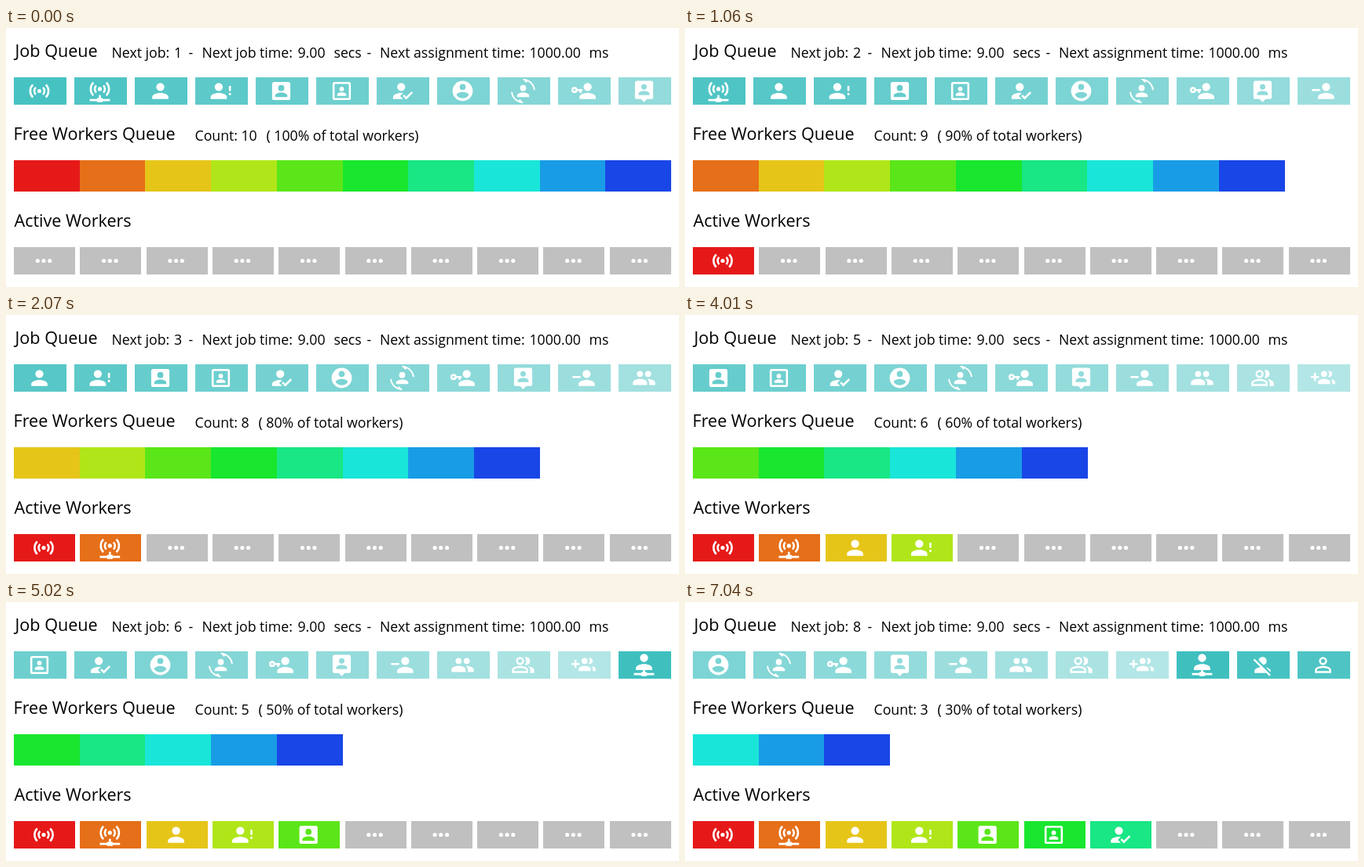
An HTML page for the animation above (8000 ms loop, 857x331 px).

```html
<!DOCTYPE html>
<html lang="en">
<head>
<meta charset="utf-8">
<title>Job queue</title>
<style>
  html, body { margin: 0; width: 100%; height: 100%; overflow: hidden; background: #fff; }
  svg { display: block; width: 857px; height: 331px; }
  text { font: 17.7px "Open Sans", "Noto Sans", sans-serif; white-space: pre; }
  text.title { font-size: 21.6px; }
  path { fill: #fff; fill-rule: evenodd; }
  rect { shape-rendering: crispEdges; }
</style>
</head>
<body>
<svg id="stage" viewBox="0 0 857 331"></svg>
<script>
const LOOP = 8000;
const ASSIGN_TIMES = [970, 2070, 3000, 4010, 5020, 6030, 7040];
const WORKERS = 10, VISIBLE_JOBS = 11, ICON_SCALE = 1.29;

// Icon parts, drawn on a 24-unit grid
const dot = (x, y, r) =>
  `M${x - r} ${y}a${r} ${r} 0 1 0 ${2 * r} 0a${r} ${r} 0 1 0 ${-2 * r} 0z`;

const shoulders = (x, y, w, h, foot) =>
  `M${x} ${y}c${w * .55} 0 ${w} ${h * .45} ${w} ${h}v${foot}h${-2 * w}v${-foot}` +
  `c0 ${-h * .55} ${w * .45} ${-h} ${w} ${-h}z`;

const person = (x = 12, y = 8, r = 4) =>
  dot(x, y, r) + shoulders(x, y + r * 1.5, r * 2, r, r / 2);

const outline = x =>
  dot(x, 8, 4) + dot(x, 8, 2.1) + shoulders(x, 13, 8, 4, 3) + shoulders(x, 14.9, 6.1, 2.1, 1.1);

const box = (x, y, size, r) => {
  const side = size - 2 * r, arc = (dx, dy) => `a${r} ${r} 0 0 1 ${dx} ${dy}`;
  return `M${x + r} ${y}h${side}${arc(r, r)}v${side}${arc(-r, r)}h${-side}${arc(-r, -r)}v${-side}${arc(r, -r)}z`;
};

const wave = (y, r, side) => {
  const outer = r * Math.SQRT1_2, inner = (r - 2) * Math.SQRT1_2, sweep = side > 0 ? 1 : 0;
  return `M${12 + side * outer} ${y - outer}A${r} ${r} 0 0 ${sweep} ${12 + side * outer} ${y + outer}` +
    `L${12 + side * inner} ${y + inner}A${r - 2} ${r - 2} 0 0 ${1 - sweep} ${12 + side * inner} ${y - inner}z`;
};

const antenna = y =>
  dot(12, y, 2) + wave(y, 6, -1) + wave(y, 6, 1) + wave(y, 10, -1) + wave(y, 10, 1);

const network = top =>
  `M11 ${top}h2V19h1a1 1 0 0 1 1 1h7v2h-7a1 1 0 0 1-1 1h-4a1 1 0 0 1-1-1H2v-2h7a1 1 0 0 1 1-1h1z`;

const IDLE = dot(6, 12, 2) + dot(12, 12, 2) + dot(18, 12, 2);

const JOB_ICONS = [
  antenna(12),
  antenna(10) + network(16),
  person(),
  person(10) + "M20 7h2v5h-2zM20 14h2v2h-2z",
  box(3, 3, 18, 2) + person(12, 9, 3),
  box(3, 3, 18, 2) + "M5 5h14v14H5z" + person(12, 10, 2.25),
  dot(11, 8, 4) + "M10 17l3 3H3v-2c0-2.2 3.6-4 8-4l1.9.1z" +
    "M21.1 12.5l1.4 1.4-6.5 6.6-3.5-3.5 1.4-1.4 2.1 2.1z",
  dot(12, 12, 10) + dot(12, 8, 3) +
    "M12 19.2c-2.5 0-4.7-1.3-6-3.2 0-2 4-3.1 6-3.1s6 1.1 6 3.1c-1.3 1.9-3.5 3.2-6 3.2z",
  person(12, 9, 3) +
    "M7.5 21.5l1.35-1.34 3.8 3.8L12 24C5.7 24 .56 19.2.05 13h1.5c.36 3.8 2.7 6.9 5.95 8.5z" +
    "M16.5 2.5l-1.35 1.34-3.8-3.8L12 0c6.3 0 11.4 4.8 11.95 11h-1.5c-.36-3.8-2.7-6.9-5.95-8.5z",
  person(16) + dot(3, 11, 3) + dot(3, 11, 1) + "M5.9 10H11v2h-1v2H8v-2H5.9z",
  "M5 2h14a2 2 0 0 1 2 2v14a2 2 0 0 1-2 2h-4l-3 3-3-3H5a2 2 0 0 1-2-2V4a2 2 0 0 1 2-2z" +
    person(12, 8, 2.7),
  person(15) + "M1 10h8v2H1z",
  dot(8, 8, 3) + dot(16, 8, 3) + shoulders(8, 13, 7, 3.5, 2.5) +
    "M16 13c2.3 0 7 1.2 7 3.5V19h-6v-2.5c0-1.5-.8-2.6-2-3.45z",
  outline(9) + "M13.7 4.2a4 4 0 1 1 0 7.6 6 6 0 0 0 0-7.6z" +
    "M16.5 13.2C18 14 19 15.3 19 17v3h4v-3c0-2.2-3.7-3.5-6.5-3.8z",
  dot(13, 8, 3) + shoulders(13, 13, 6, 3, 2) + "M0 10h3V7h2v3h3v2H5v3H3v-3H0z" +
    "M19.6 13.2c.9.7 1.4 1.6 1.4 2.8v2h3v-2c0-1.5-2.4-2.5-4.4-2.8z" +
    "M17.1 5.1a3 3 0 1 1 0 5.7 5 5 0 0 0 0-5.7z",
  person(12, 5) + network(17),
  "M12 4a4 4 0 0 1 .75 7.93L8.07 7.25A4 4 0 0 1 12 4z" +
    "M12.28 14L20 21.72 18.73 23l-3-3H4v-2c0-1.84 2.5-3.4 5.87-3.86L2.78 7.05l1.27-1.27z" +
    "M20 18v1.18l-4.86-4.86C18 14.93 20 16.35 20 18z",
  outline(12)
];

const jobColor = job => `hsl(180 50% ${50 + 2 * ((job + 1) % 16)}%)`;
const workerColor = worker => `hsl(${25.2 * worker} 80% 50%)`;

const rect = (x, y, w, h, fill) =>
  `<rect x="${x}" y="${y}" width="${w}" height="${h}" fill="${fill}"/>`;
const text = (x, y, content, style = "") =>
  `<text x="${x}" y="${y}" class="${style}">${content}</text>`;
const tile = (x, y, w, fill, icon) =>
  rect(x, y, w, 35, fill) +
  `<path transform="translate(${x + w / 2 - 1} ${y + 17.5}) scale(${ICON_SCALE}) translate(-12 -12)" d="${icon}"/>`;
const repeat = (count, draw) => Array.from({ length: count }, (_, i) => draw(i)).join("");

function scene(assigned) {
  const free = WORKERS - assigned;
  return text(11.5, 37, "Job Queue", "title") +
    text(134.5, 38, "Next job:") + text(214, 38, assigned + 1) + text(232.5, 38, "-") +
    text(249.5, 38, "Next job time:") + text(371.5, 38, "9.00") +
    text(417.5, 38, "secs") + text(459.5, 38, "-") +
    text(476, 38, "Next assignment time:") + text(666.5, 38, "1000.00") + text(742.5, 38, "ms") +
    repeat(VISIBLE_JOBS, i =>
      tile(10 + 77 * i, 63, 67, jobColor(assigned + i), JOB_ICONS[assigned + i])) +

    text(9.5, 143, "Free Workers Queue", "title") +
    text(240.5, 144, "Count:") + text(299.5, 144, free) +
    text(free > 9 ? 331.5 : 321.5, 144, `( ${free * 10}% of total workers)`) +
    repeat(free, i => rect(10 + 83.7 * i, 169, 84.05, 40, workerColor(assigned + i))) +

    text(10.5, 254, "Active Workers", "title") +
    repeat(WORKERS, i => i < assigned
      ? tile(10 + 84.3 * i, 280, 78, workerColor(i), JOB_ICONS[i])
      : tile(10 + 84.3 * i, 280, 78, "#c0c0c0", IDLE));
}

const stage = document.getElementById("stage");
const start = performance.now();
let shown = -1;

function tick() {
  const time = (performance.now() - start) % LOOP;
  const assigned = ASSIGN_TIMES.filter(t => t <= time).length;
  if (assigned !== shown) stage.innerHTML = scene(shown = assigned);
  requestAnimationFrame(tick);
}
tick();
</script>
</body>
</html>
```
